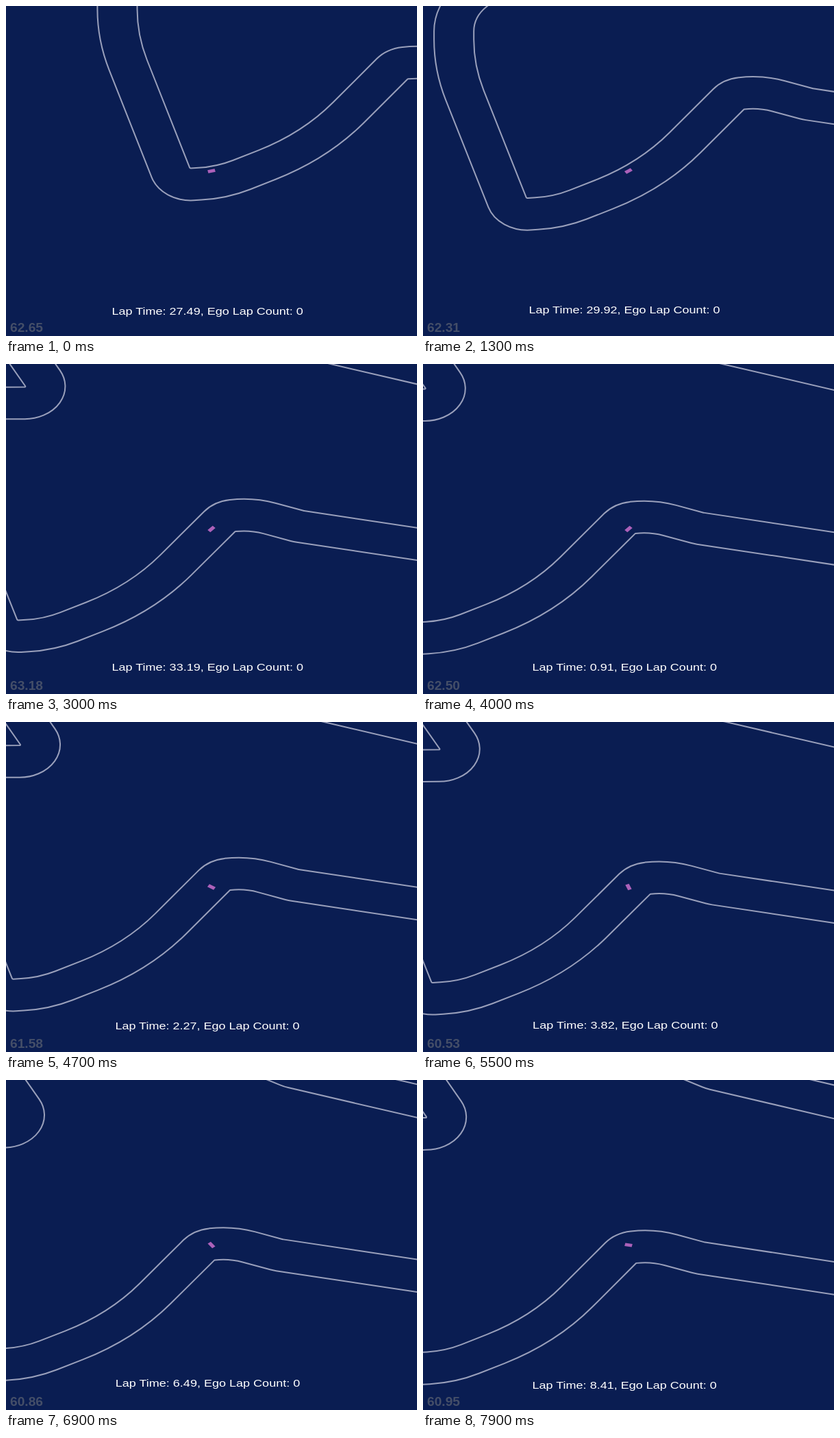
Animation, 600 px wide and 481 px high, one loop 8000 ms. Source, as an HTML page:

```html
<!DOCTYPE html>
<html lang="en">
<head>
<meta charset="utf-8">
<title>Lap view</title>
<style>
  html, body { margin: 0; width: 100%; height: 100%; overflow: hidden; background: #0a1d52; }
  svg { display: block; width: 600px; height: 481px; }
  text { font-family: "Liberation Sans", Arial, sans-serif; }
  #track path { fill: none; stroke: #9aa0bb; stroke-width: 2; vector-effect: non-scaling-stroke; }
</style>
</head>
<body>
<svg viewBox="0 0 600 481">
  <g id="track"></g>
  <rect id="car" x="-14.5" y="-7.75" width="29" height="15.5" fill="#ac61b9"/>
  <text id="lap" font-size="49" text-anchor="middle" y="17" fill="#fff"></text>
  <text id="rate" x="6" y="475" font-size="19.2" font-weight="bold" fill="#444e68"></text>
</svg>
<script>
const LOOP = 8000, STEP = 100, RESET = 3600;
const WIDTH = 600, HEIGHT = 481, MARGIN = 1600;
const CAR_LENGTH = 29, CAR_WIDTH = 15.5, HALF_ROAD = 79;

// Centre lines: corners as x, y, turn radius; straights and arcs join them
const circuit = [
  [-211, -1611, 0], [83, -1088, 82], [-374, -1086, 250], [-374, -655, 900],
  [-142, 70, 84], [41, 57, 450], [411, -123, 950], [737, -526, 80],
  [844, -541, 320], [1031, -478, 100], [1700, -353, 0]
];
const farRoad = [[884, -1486, 0], [1084, -1384, 100], [1700, -1205, 0]];

// Bezier curve of the first drive
const driveX = [0, 301, 565, 780], driveY = [0, -68, -340, -562];

// time, lap seconds, frames per second
const readings = [
  [0, 27.49, 62.65], [1300, 29.92, 62.31], [3000, 33.19, 63.18], [3500, 34.15, 62.8],
  [3600, 0.14, 62.7], [4000, 0.91, 62.5], [5500, 3.82, 60.53], [6900, 6.49, 60.86], [7900, 8.41, 60.95]
];

const byId = id => document.getElementById(id);

function direction(p, q) {
  const length = Math.hypot(q[0] - p[0], q[1] - p[1]);
  return [(q[0] - p[0]) / length, (q[1] - p[1]) / length];
}

// One road edge; side is 1 to the right of the travel direction, -1 to the left
function edgePath(corners, side) {
  const shift = side * HALF_ROAD;
  const at = ([x, y], [dx, dy], along) => [x + dx * along - dy * shift, y + dy * along + dx * shift];
  const last = corners.length - 1;
  let d = "M" + at(corners[0], direction(corners[0], corners[1]), 0);
  for (let i = 1; i < last; i++) {
    const corner = corners[i], radius = corner[2];
    const a = direction(corners[i - 1], corner), b = direction(corner, corners[i + 1]);
    const turn = Math.atan2(a[0] * b[1] - a[1] * b[0], a[0] * b[0] + a[1] * b[1]);
    const cut = radius * Math.tan(Math.abs(turn) / 2);
    const r = radius - Math.sign(turn) * shift;
    d += `L${at(corner, a, -cut)}A${r} ${r} 0 0 ${turn > 0 ? 1 : 0} ${at(corner, b, cut)}`;
  }
  return d + "L" + at(corners[last], direction(corners[last - 1], corners[last]), 0);
}

function bezier([a, b, c, d], k) {
  const m = 1 - k;
  return {
    value: m * m * m * a + 3 * m * m * k * b + 3 * m * k * k * c + k * k * k * d,
    slope: m * m * (b - a) + 2 * m * k * (c - b) + k * k * (d - c)
  };
}

function read(t) {
  let i = 0;
  while (i < readings.length - 2 && t >= readings[i + 1][0]) i++;
  const a = readings[i], b = readings[i + 1], k = (t - a[0]) / (b[0] - a[0]);
  return [1, 2].map(n => a[n] + (b[n] - a[n]) * k);
}

function carPose(t, lap) {
  if (t < RESET) {
    const k = t / (RESET - STEP), x = bezier(driveX, k), y = bezier(driveY, k);
    return { x: x.value, y: y.value, heading: Math.atan2(-y.slope, x.slope) };
  }
  // After the reset the car circles at full lock and drifts slowly right
  const angle = (208.3 * lap - 233.5) * Math.PI / 180;
  return {
    x: 721 + 2.27 * lap + 40 * Math.cos(angle),
    y: -502 - 40 * Math.sin(angle),
    heading: angle + Math.PI / 2
  };
}

function draw(t) {
  const [lap, rate] = read(t);
  const { x, y, heading } = carPose(t, lap);
  // The view keeps a fixed margin around the car's bounding box
  const c = Math.abs(Math.cos(heading)), s = Math.abs(Math.sin(heading));
  const boxW = CAR_LENGTH * c + CAR_WIDTH * s, boxH = CAR_LENGTH * s + CAR_WIDTH * c;
  const sx = WIDTH / (MARGIN + boxW), sy = HEIGHT / (MARGIN + boxH);
  const place = (id, left, top, rest = "") => byId(id).setAttribute("transform",
    `translate(${left} ${top}) scale(${sx} ${sy}) ${rest}`);

  place("track", WIDTH / 2, HEIGHT / 2, `translate(${-x} ${-y})`);
  place("car", WIDTH / 2, HEIGHT / 2, `rotate(${-heading * 180 / Math.PI})`);
  place("lap", MARGIN / 2 * sx, HEIGHT - (boxH + 100) * sy);
  byId("lap").textContent = `Lap Time: ${lap.toFixed(2)}, Ego Lap Count: 0`;
  byId("rate").textContent = rate.toFixed(2);
}

for (const road of [circuit, farRoad]) {
  for (const side of [-1, 1]) {
    const path = document.createElementNS("http://www.w3.org/2000/svg", "path");
    path.setAttribute("d", edgePath(road, side));
    byId("track").append(path);
  }
}

const start = performance.now();
function tick() {
  const t = (performance.now() - start) % LOOP;
  draw(Math.floor(t / STEP) * STEP);
  requestAnimationFrame(tick);
}
tick();
</script>
</body>
</html>
```
